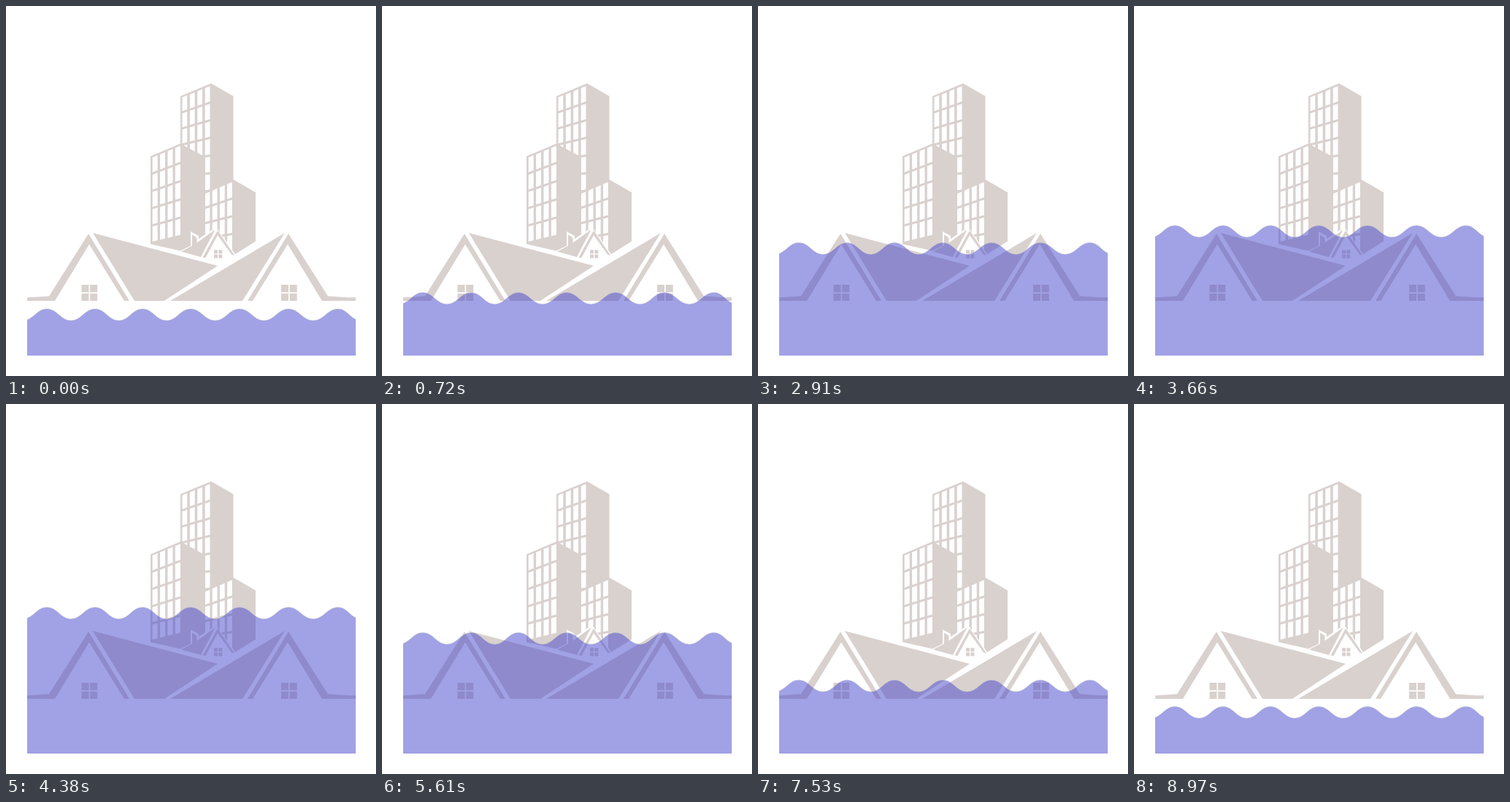
An HTML page for the animation above (9000 ms loop, 507 by 507 pixels).

```html
<!DOCTYPE html>
<html lang="en">
<head>
<meta charset="utf-8">
<title>Rising water</title>
<style>
  html, body { margin: 0; width: 100%; height: 100%; overflow: hidden; background: #fff; }
  svg { display: block; width: 100%; height: 100%; }
</style>
</head>
<body>
<svg viewBox="0 0 507 507">
  <defs>
    <clipPath id="pool"><rect x="29" y="200" width="450.3" height="279"/></clipPath>
  </defs>
  <g id="towers" fill="#d9d1ce"></g>
  <path fill="#fff" d="M190 324.5 239 335.5 253 328.500V309L264 315V319L288 303 314 340 345 320.500V420H190Z"/>
  <g id="houses" fill="#d9d1ce">
    <!-- small house -->
    <path d="M240 336.500 255 328.500V313.500L261.500 317.500V324.500L286.500 306.500 267 344Z"/>
    <path d="M290 307.500 313 341.500 309.500 341 290 314 273.500 345 269.500 344.500Z"/>
    <!-- main roofs -->
    <path d="M119 311 290 356 217 404H176Z"/>
    <path d="M382 311 225 404H324Z"/>
    <!-- gables -->
    <path id="gable" d="M113 312 169 404H162L114 326.500 67 404H29V399.500L59 397.500Z"/>
    <use href="#gable" transform="matrix(-1 0 0 1 500 0)"/>
    <rect x="471" y="399.300" width="8.300" height="4.700"/>
  </g>
  <g clip-path="url(#pool)">
    <path id="water" fill="rgb(69,69,203)" fill-opacity=".5" stroke="#c4c4cc" stroke-opacity=".45"/>
  </g>
</svg>
<script>
const LOOP = 9000, RISE = 140.3, CREST = 415, TROUGH = 431;
const crests = [56, 122, 187, 253, 320, 387, 455];
const towers = document.getElementById('towers');
const houses = document.getElementById('houses');
const water = document.getElementById('water');

function shape(parent, d, fill) {
  const path = document.createElementNS('http://www.w3.org/2000/svg', 'path');
  path.setAttribute('d', d);
  if (fill) path.setAttribute('fill', fill);
  parent.append(path);
}

// Tower with a glazed left face; bars run from the left edge to the right edge.
function tower({ outline, x0, x1, left, right, leftStep, rightStep, rows, firstPane, paneStep, paneWidth }) {
  shape(towers, outline);
  const barY = (row, x) => {
    const l = left + row * leftStep, r = right + row * rightStep;
    return l + (r - l) * (x - x0) / (x1 - x0);
  };
  let panes = '';
  for (let row = 0; row < rows; row++) {
    for (let col = 0; col < 4; col++) {
      const a = firstPane + col * paneStep, b = a + paneWidth;
      panes += `M${a} ${barY(row, a) + 1.6}L${b} ${barY(row, b) + 1.6}` +
               `L${b} ${barY(row + 1, b) - 1.6}L${a} ${barY(row + 1, a) - 1.6}Z`;
    }
  }
  shape(towers, panes, '#fff');
}

tower({ outline: 'M239 123.5 281 106 311.500 123.500V270H239Z', x0: 239, x1: 280,
  left: 124.5, right: 108, leftStep: 22, rightStep: 24.2, rows: 6,
  firstPane: 241.5, paneStep: 10.4, paneWidth: 6.8 });
tower({ outline: 'M273 254 311 237.500 342 255.500V345H273Z', x0: 273, x1: 310,
  left: 255.5, right: 239.5, leftStep: 21, rightStep: 24.3, rows: 4,
  firstPane: 272.5, paneStep: 10.2, paneWidth: 6.8 });
tower({ outline: 'M198 206 239 188.500 273 207V345H198Z', x0: 198, x1: 239,
  left: 207, right: 190, leftStep: 23.6, rightStep: 25, rows: 5,
  firstPane: 200.7, paneStep: 10.4, paneWidth: 7 });

function houseWindow(x, y, w, h, gap) {
  let d = '';
  for (const px of [x, x + w + gap])
    for (const py of [y, y + h + gap]) d += `M${px} ${py}h${w}v${h}h${-w}Z`;
  shape(houses, d);
}
houseWindow(103.5, 382, 10, 10.2, 1.7);
houseWindow(377, 382, 10, 10.2, 1.7);
houseWindow(285, 334.3, 5, 5, 1.3);

function waterPath() {
  let x = 23, y = TROUGH, d = `M${x} ${y}`;
  const swing = (nx, ny) => {
    const k = (nx - x) * 0.43;
    d += `C${x + k} ${y} ${nx - k} ${ny} ${nx} ${ny}`;
    x = nx;
    y = ny;
  };
  crests.forEach((c, i) => {
    swing(c, CREST);
    swing(i < 6 ? (c + crests[i + 1]) / 2 : 486, TROUGH);
  });
  return d + 'V700H23Z';
}
water.setAttribute('d', waterPath());

// Steady rise, then a fall that slows down near the end.
function level(t) {
  const u = t / (LOOP / 2);
  if (u < 1) return u;
  const v = u - 1;
  return 1 - (1.11 * v - 0.11 * v ** 6);
}

function draw(now) {
  water.setAttribute('transform', `translate(0 ${-RISE * level(now % LOOP)})`);
}

const start = performance.now();
function tick() {
  draw(performance.now() - start);
  requestAnimationFrame(tick);
}
tick();
</script>
</body>
</html>
```
